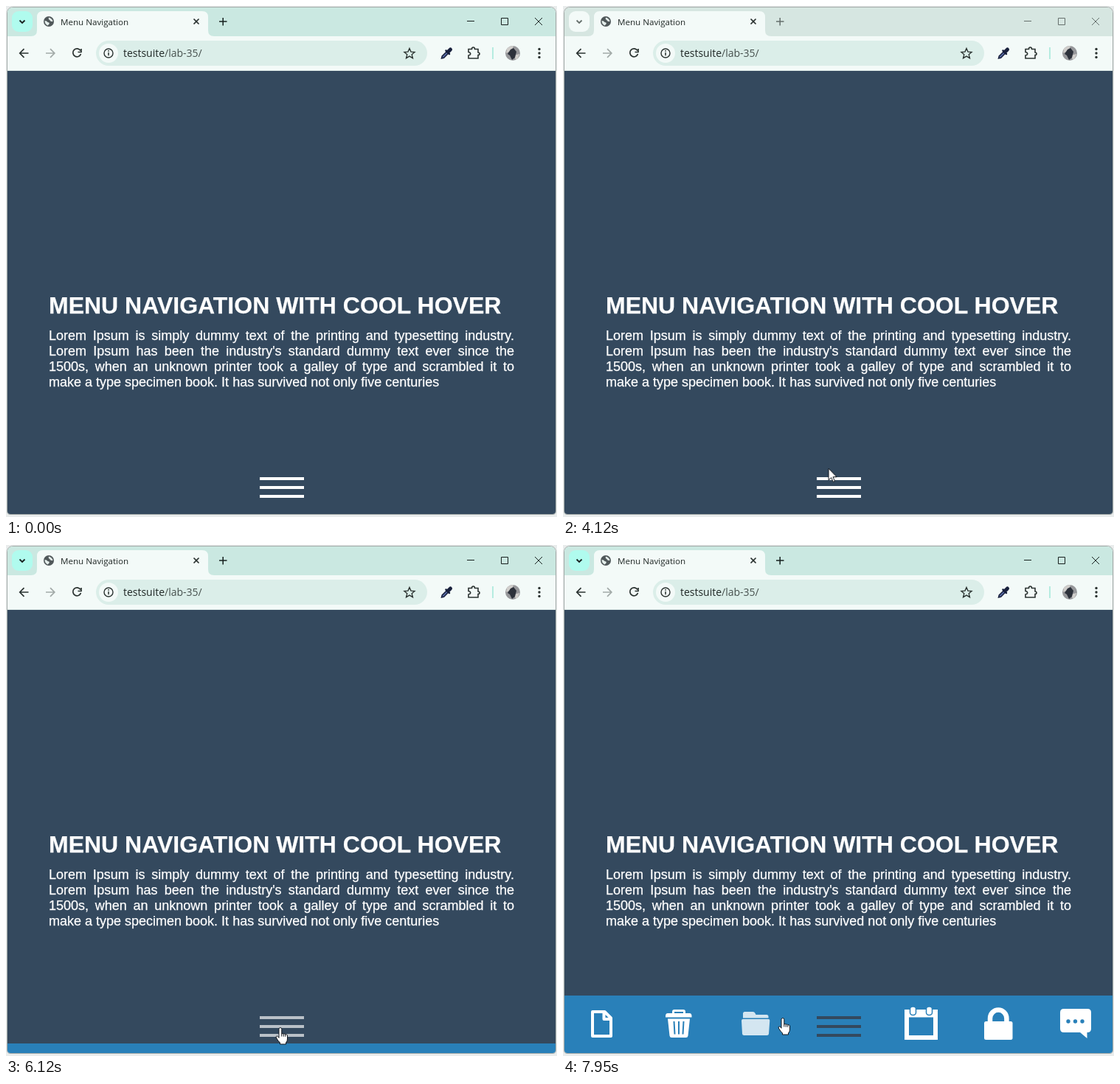
Animation, 747 px wide and 693 px high, one loop 8 s. Source, as an HTML page:

```html
<!DOCTYPE html>
<html lang="en">
<head>
<meta charset="utf-8">
<title>Menu Navigation</title>
<style>
html, body { margin: 0; width: 100%; height: 100%; overflow: hidden; background: #e9ecec; }
svg { position: absolute; left: 0; top: 0; width: 747px; height: 693px; }
.ui { font-family: "Open Sans", "Noto Sans", sans-serif; fill: #1f2725; }
.line { fill: none; stroke: #2b3331; stroke-width: 1.7; }
.copy {
  position: absolute; left: 58px; top: 388px; width: 631px; color: #fff;
  -webkit-text-stroke: .25px #fff;
}
h1 { margin: 0; font: bold 32px/37px "Liberation Sans", Arial, sans-serif; white-space: nowrap; }
p { margin: 12px 0 0; font: 18px/21px "Liberation Sans", Arial, sans-serif; text-align: justify; }

.focus, .menu, .bars, .fade, .folder, .cursor, .pointer, .arrow, .hand, .click {
  animation: 8s ease infinite;
}
.focus { animation-name: focus; animation-timing-function: linear; }
.menu { animation-name: slide; }
.bars { animation-name: tint; }
.fade { animation-name: hover-bars; }
.folder { animation-name: hover-folder; }
.pointer { animation-name: travel; animation-timing-function: ease-in-out; }
.cursor { animation-name: enter; animation-timing-function: step-end; }
.arrow { animation-name: arrow; animation-timing-function: step-end; }
.hand { animation-name: hand; animation-timing-function: step-end; }
.click { animation-name: click; animation-timing-function: step-end; }

@keyframes focus {
  0%, 2.3% { opacity: 1 }
  3.125%, 59.2% { opacity: 0 }
  60%, 100% { opacity: 1 }
}
@keyframes slide {
  0%, 60.75% { transform: translateY(78px) }
  65.75%, 73.875% { transform: none }
  78.875%, 87.08% { transform: translateY(78px) }
  92.08%, 100% { transform: none }
}
@keyframes tint {
  0%, 60.75% { fill: #fff }
  65.75%, 73.875% { fill: #34495e }
  78.875%, 87.08% { fill: #fff }
  92.08%, 100% { fill: #34495e }
}
@keyframes hover-bars {
  0%, 52.5% { opacity: 1 }
  54.4%, 96.2% { opacity: .8 }
  98.5%, 100% { opacity: 1 }
}
@keyframes hover-folder {
  0%, 97% { opacity: 1 }
  99.2%, 100% { opacity: .8 }
}
@keyframes enter { 0% { opacity: 0 } 13.7%, 100% { opacity: 1 } }
@keyframes arrow { 0% { opacity: 1 } 53%, 100% { opacity: 0 } }
@keyframes hand { 0% { opacity: 0 } 53%, 100% { opacity: 1 } }
@keyframes click {
  0% { opacity: 0 }
  59.2% { opacity: 1 }
  60.6% { opacity: 0 }
  72.4% { opacity: 1 }
  74.3% { opacity: 0 }
  85.9% { opacity: 1 }
  87.3%, 100% { opacity: 0 }
}
@keyframes travel {
  0%, 13.6% { transform: translate(695px, 315px); animation-timing-function: linear }
  17.5% { transform: translate(480px, 281px); animation-timing-function: ease-out }
  19.5%, 24.5% { transform: translate(423px, 290px) }
  34.4%, 35% { transform: translate(314px, 452px) }
  44.4%, 45.25% { transform: translate(353px, 591px); animation-timing-function: ease-in }
  51.5% { transform: translate(360px, 627px); animation-timing-function: ease-out }
  54.6%, 55.5% { transform: translate(369px, 647px) }
  56.75%, 65% { transform: translate(371px, 650px) }
  67%, 95% { transform: translate(372px, 655px) }
  99.3%, 100% { transform: translate(298px, 642px) }
}
</style>
</head>
<body>
<svg viewBox="0 0 747 693">
  <defs>
    <clipPath id="window"><path d="M2 10q0-8 8-8H737q8 0 8 8V685q0 4-4 4H6q-4 0-4-4Z"/></clipPath>
    <g id="controls" fill="none">
      <path d="M18.5 19.5l3.5 3.5 3.5-3.5" stroke-width="1.8"/>
      <path d="M289 21h10.500M294.200 16v10.500" stroke-width="1.5"/>
      <path d="M625 20.500h10M671.500 16.500h9v9h-9zM717 16l10 10M727 16l-10 10"/>
    </g>
  </defs>

  <path d="M1.500 10q0-8.500 8.500-8.500H737q8.500 0 8.500 8.500V685q0 4.500-4.500 4.500H6q-4.500 0-4.500-4.500Z" fill="none" stroke="#a3aaa8"/>
  <g clip-path="url(#window)">
    <!-- Title bar, unfocused and focused -->
    <rect width="747" height="42" fill="#d6e6e1"/>
    <rect x="8" y="7" width="28" height="28" rx="9" fill="#f3faf8"/>
    <use href="#controls" stroke="#66706d"/>
    <g class="focus">
      <rect width="747" height="42" fill="#cae8e1"/>
      <rect x="8" y="7" width="28" height="28" rx="9" fill="#b0fbee"/>
      <use href="#controls" stroke="#17201e"/>
    </g>

    <!-- Tab -->
    <path d="M34 41q8 0 8-8V15q0-8 8-8H266q8 0 8 8V33q0 8 8 8Z" fill="#f3faf8"/>
    <circle cx="58" cy="21" r="7" fill="#50585a"/>
    <path d="M52.500 20q3 0 4 2 3 0 2 2.500l-2 2q-4-2-4-6.500M58 15.500q-1 3 1.500 3.500 0 2 4 2-.500-4-5.500-5.500" fill="#e4eeeb"/>
    <text class="ui" x="74" y="26" font-size="11.600">Menu Navigation</text>
    <path class="line" d="M254.500 17.500l7 7M261.500 17.500l-7 7"/>

    <!-- Toolbar -->
    <rect y="41" width="747" height="47" fill="#f3faf8"/>
    <rect y="87" width="747" height="1" fill="#dfece8"/>
    <rect x="122" y="47" width="449" height="34" rx="17" fill="#dbeee9"/>
    <circle cx="139" cy="64" r="13" fill="#f3faf8"/>
    <g class="line">
      <path d="M30.500 64H19M24.500 58.200L18.700 64l5.800 5.800"/>
      <path d="M54 64h11.500M60 58.200l5.800 5.800-5.800 5.800" stroke="#a2aaa8"/>
      <path d="M101 60.500a5.500 5.500 0 1 0 .500 4.500M102 58v4.500h-4.500"/>
      <circle cx="139" cy="64" r="6" stroke-width="1.400"/>
      <path d="M139 63v4.200M139 60v1.700" stroke-width="1.500"/>
      <path d="M547 57.500l2 4.600 5 .4-3.800 3.300 1.200 4.900-4.400-2.600-4.400 2.600 1.200-4.900-3.800-3.300 5-.4z" stroke-width="1.400"/>
      <path d="M627 58.500h4.500q0-2.500 2-2.500t2 2.500h4.500v4.500q2 0 2 1.800t-2 1.800v4.400h-13v-4q2.700-.4 2.700-2.200t-2.700-2.300z" stroke-width="1.600"/>
    </g>
    <text class="ui" x="159" y="69" font-size="14">testsuite<tspan fill="#46504d">/lab-35/</tspan></text>
    <g stroke="#18203c" stroke-linecap="round" fill="none">
      <path d="M590.500 71l.8-3 6-6 2.300 2.300-6 6z" fill="#5b6ea8" stroke-width="1.500"/>
      <path d="M596.500 60.500l4.500 4.500" stroke-width="2.500"/>
      <path d="M599.500 62l3-3" stroke-width="5"/>
    </g>
    <path d="M660 56v16" stroke="#b5ece0" stroke-width="2"/>
    <circle cx="687" cy="64" r="10" fill="#96979a"/>
    <path d="M679 58q4-4 9-4l-2 6-8 4zM689 67l7-2q-1 6-5 8z" fill="#d0cecb"/>
    <path d="M684 59l4-2 4 5-2 8-4 3-3-6-3-2z" fill="#2d323b"/>
    <g fill="#2b3331"><circle cx="723" cy="58.500" r="1.700"/><circle cx="723" cy="64" r="1.700"/><circle cx="723" cy="69.500" r="1.700"/></g>

    <!-- Page -->
    <rect y="88" width="747" height="605" fill="#34495e"/>

    <g class="menu" fill="#fff">
      <rect y="611" width="747" height="80" fill="#2980b9"/>
      <path d="M40 633H56.500L65 641.500V666H40ZM55.500 633V643H65" fill="none" stroke="#fff" stroke-width="4" stroke-linejoin="round"/>
      <!-- Bin -->
      <path d="M149.500 636v-3q0-1.500 1.500-1.500h12q1.500 0 1.500 1.500v3" fill="none" stroke="#fff" stroke-width="3"/>
      <path d="M139 639q0-4 3-4h29.500q3 0 3 4v1.500H139zM142 642.500h30l-2.500 23q-.300 2.500-3 2.500h-19q-2.700 0-3-2.500z"/>
      <path d="M150.500 646l1 17.500M157 646v17.500M163.500 646l-1 17.500" stroke="#2980b9" stroke-width="2"/>
      <!-- Folder -->
      <path class="folder" d="M244 641.500v-6q0-2.500 2.500-2.500h11q2 0 3 2l1 2h14.500q2.500 0 2.500 2.500v2zM244 643h34.500q2 0 1.800 2l-1.300 18q-.2 2-2.500 2h-31q-2.300 0-2.500-2l-1-18q0-2 2-2z"/>
      <!-- Calendar -->
      <path d="M463 630h45v41h-45zM469 640.500v24.500h33v-24.500z" fill-rule="evenodd"/>
      <g stroke="#2980b9" stroke-width="1.500">
        <rect x="470.500" y="626" width="8" height="11.500" rx="3.500"/>
        <rect x="492.500" y="626" width="8" height="11.500" rx="3.500"/>
      </g>
      <!-- Lock -->
      <rect x="571" y="646" width="38.500" height="25" rx="2.500"/>
      <path d="M579 648v-6a11.200 11.500 0 0 1 22.400 0v6" fill="none" stroke="#fff" stroke-width="6.500"/>
      <!-- Chat -->
      <path d="M679 629h32q5 0 5 5v22q0 5-5 5h-.5v8l-9.500-8h-22q-5 0-5-5v-22q0-5 5-5z"/>
      <g fill="#2980b9"><circle cx="685" cy="646" r="2.700"/><circle cx="694.500" cy="646" r="2.700"/><circle cx="704" cy="646" r="2.700"/></g>
    </g>

    <g class="fade"><path class="bars" d="M344 639h60v4h-60zM344 651h60v4h-60zM344 663h60v4h-60z"/></g>
  </g>
</svg>

<div class="copy">
  <h1>MENU NAVIGATION WITH COOL HOVER</h1>
  <p>Lorem Ipsum is simply dummy text of the printing and typesetting industry. Lorem Ipsum has been the industry's standard dummy text ever since the 1500s, when an unknown printer took a galley of type and scrambled it to make a type specimen book. It has survived not only five centuries</p>
</div>

<svg viewBox="0 0 747 693">
  <g class="cursor"><g class="pointer">
    <circle class="click" cx="-2" cy="-1" r="12" fill="#dcdc00" fill-opacity=".6"/>
    <g fill="#fff" stroke="#10151c" stroke-linejoin="round">
      <path class="arrow" d="M0 0V15.800L3.700 12.400 6.200 18.200 8.500 17.200 6 11.500H11Z"/>
      <path class="hand" d="M-2 1.500a1.900 1.900 0 0 1 3.800 0V8q1.300-1.200 2.500.2 1.500-.8 2.500.6 2-.6 2.700 1.200V15q0 3-2 5v2H-.5v-2q-2.500-2-5.300-7-.3-2 1.300-2 1.300.3 2.500 2.300zM1.800 8v3.500M4.300 8.200v3.500M6.800 8.800v3"/>
    </g>
  </g></g>
</svg>
</body>
</html>
```
